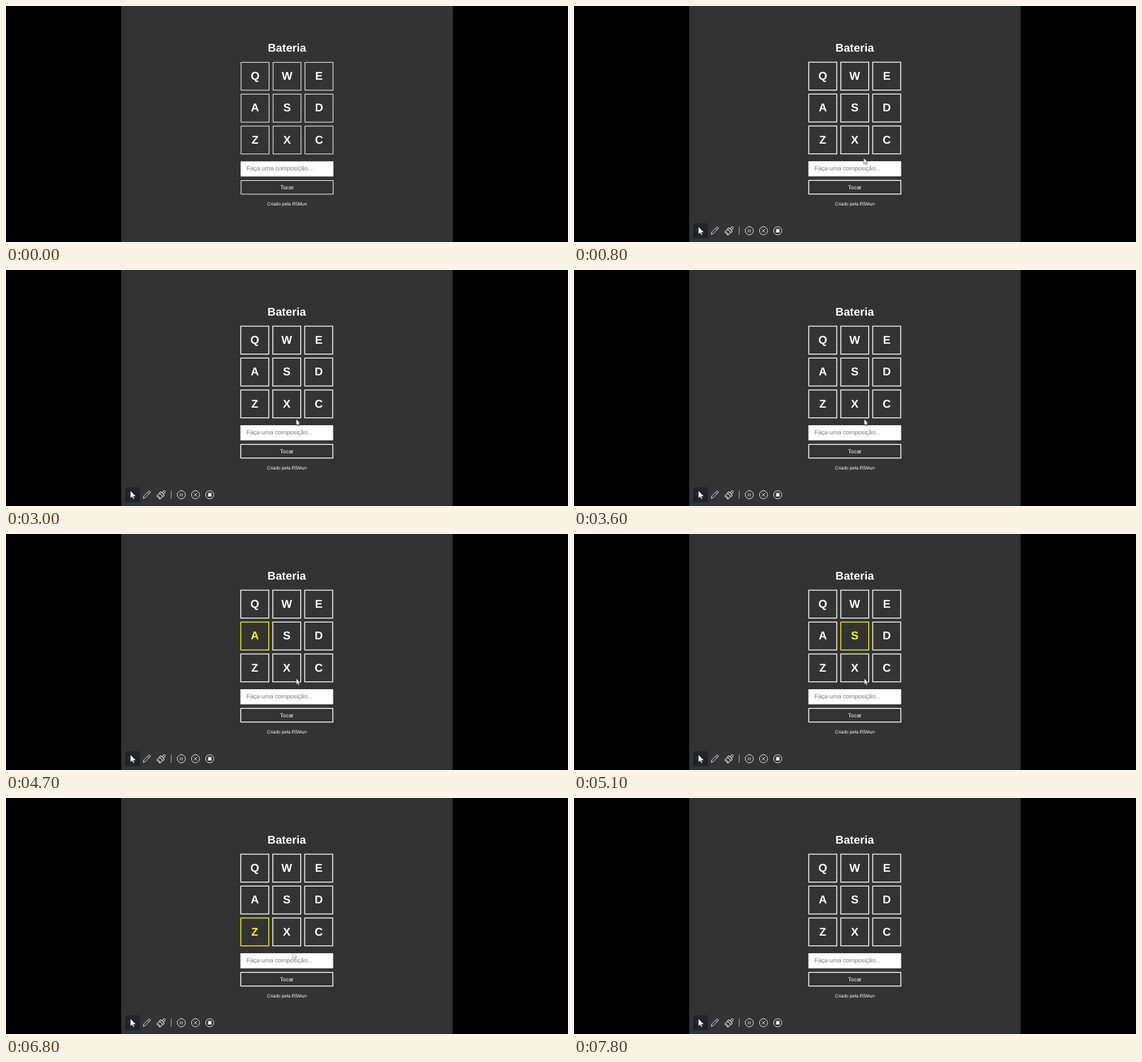
An HTML page for the animation above (8 s loop, 798 by 336 pixels).

```html
<!DOCTYPE html>
<html lang="pt">
<head>
<meta charset="utf-8">
<title>Bateria</title>
<style>
  html, body { margin: 0; width: 100%; height: 100%; overflow: hidden; background: #000; }
  svg { display: block; width: 798px; height: 336px; }
  text { font-family: "Liberation Sans", Arial, sans-serif; fill: #fff; text-rendering: geometricPrecision; }
  .bold { font-weight: 700; font-size: 16.1px; }
  .mid { text-anchor: middle; }
  .box { fill: none; stroke: #fff; }
  .pad { color: #fff; }
  .pad text { fill: currentColor; }
  .pad rect { stroke: currentColor; }
  .icons { fill: none; stroke: #dcdce0; stroke-width: .95; stroke-linejoin: round; }
  .icons .solid { fill: #ececee; stroke: none; }
</style>
</head>
<body>
<svg viewBox="0 0 798 336">
  <rect id="panel" x="163.5" width="470.5" height="336" fill="#333"/>
  <g id="app">
    <text class="bold mid" x="398.6" y="65">Bateria</text>
    <g id="pads"></g>
    <rect x="332.8" y="221" width="131.7" height="21.5" fill="#fff"/>
    <text x="341.2" y="234.3" font-size="8.63" style="fill:#757575">Faça uma composição...</text>
    <rect class="box" x="333.4" y="248.3" width="130.7" height="19.4"/>
    <text class="mid" x="398.8" y="260.5" font-size="7.95">Tocar</text>
    <text class="mid" x="398.7" y="284.3" font-size="6.57">Criado pela R5Mun</text>
  </g>
  <g id="toolbar" class="icons">
    <rect x="169" y="309.5" width="21" height="21" fill="#222326" stroke="none"/>
    <path class="solid" d="M176.8 314.6v10l2.4-2.1 1.5 3.3 1.5-.7-1.5-3.2h3.3z"/>
    <path d="M194.8 325.2l.8-3.4 6.9-6.9q1-.8 2 .1t.1 2l-6.9 6.9zM201 316.3l2.4 2.4"/>
    <path transform="translate(220.5 320) rotate(45)" d="M-1.3-2.6v-4q1.3-1.6 2.6 0v4M-3.6-2.6h7.2v2.8h-7.2zM-3.3.2v5.6h6.6V.2M-1.1 5.8V3M1.1 5.8V3"/>
    <path d="M234.5 314v12" stroke="#aaa"/>
  </g>
  <g id="cursor">
    <path d="M0 0V8.6L1.9 6.9 3.3 10 4.8 9.3 3.5 6.3H6.1Z" fill="#fff" stroke="#222" stroke-width=".6"/>
  </g>
</svg>
<script>
const LOOP = 8000, TICK = 100;
const byId = id => document.getElementById(id);
const at = (x, y) => `translate(${x}px, ${y}px)`;

// Steps are [time, value, easing towards the next value]; values hold by default.
function play(el, prop, steps) {
  const frames = steps.map(([time, value, easing = "step-end"]) =>
    ({ offset: time / LOOP, [prop]: value, easing }));
  frames.push({ ...frames.at(-1), offset: 1 });
  el.animate(frames, { duration: LOOP, iterations: Infinity }).startTime = 0;
}

// Each row of pads is struck from left to right at an even pace.
const rows = [
  { keys: "QWE", start: 2100, gap: 600 },
  { keys: "ASD", start: 4700, gap: 350 },
  { keys: "ZXC", start: 6800, gap: 300 }
];
const PITCH = 45.4, SIZE = 39.7, HIT = 300;

function addPad(key, col, row, time) {
  const x = 333.4 + col * PITCH, y = 80 + row * PITCH;
  byId("pads").insertAdjacentHTML("beforeend",
    `<g class="pad"><rect class="box" x="${x}" y="${y}" width="${SIZE}" height="${SIZE}"/>
     <text class="bold mid" x="${x + SIZE / 2}" y="${y + 24.7}">${key}</text></g>`);
  const on = Math.ceil(time / TICK) * TICK;
  play(byId("pads").lastElementChild, "color", [[0, "#fff"], [on, "#f8f814"], [on + HIT, "#fff"]]);
}
rows.forEach(({ keys, start, gap }, row) =>
  [...keys].forEach((key, col) => addPad(key, col, row, start + col * gap)));

// Round buttons: pause, cancel, stop.
const marks = [
  '<path d="M-1.3-2.3v4.6M1.3-2.3v4.6"/>',
  '<path d="M-2.2-2.2l4.4 4.4M2.2-2.2l-4.4 4.4"/>',
  '<rect class="solid" x="-2.5" y="-2.5" width="5" height="5"/>'
];
byId("toolbar").insertAdjacentHTML("beforeend", marks.map((mark, i) =>
  `<g transform="translate(${248.9 + i * 20.2} 320)"><circle r="5.8"/>${mark}</g>`).join(""));

// The page settles as the recorder bar opens.
const settle = (id, prop, before, after) => play(byId(id), prop, [[0, before], [TICK, after]]);
settle("panel", "width", "471px", "470.5px");
settle("app", "transform", at(.4, .2), at(0, 0));
settle("app", "strokeWidth", ".9px", "1.25px");
settle("toolbar", "opacity", 0, 1);

// The pointer rests, then moves one stride per tick: [start, strides, x, y].
const moves = [
  [300, 5, 411.3, 216.2],
  [1100, 1, 412, 212.3],
  [4000, 3, 412, 205.6],
  [5600, 2, 409.2, 215],
  [6100, 2, 406.8, 220]
];
let place = at(196, 315);
const path = [[0, place]];
for (const [start, strides, x, y] of moves) {
  path.push([start, place, `steps(${strides})`]);
  place = at(x, y);
  path.push([start + strides * TICK, place]);
}
play(byId("cursor"), "transform", path);
play(byId("cursor"), "opacity", [[0, 0], [200, 1], [6800, .65], [6900, 0]]);
</script>
</body>
</html>
```
